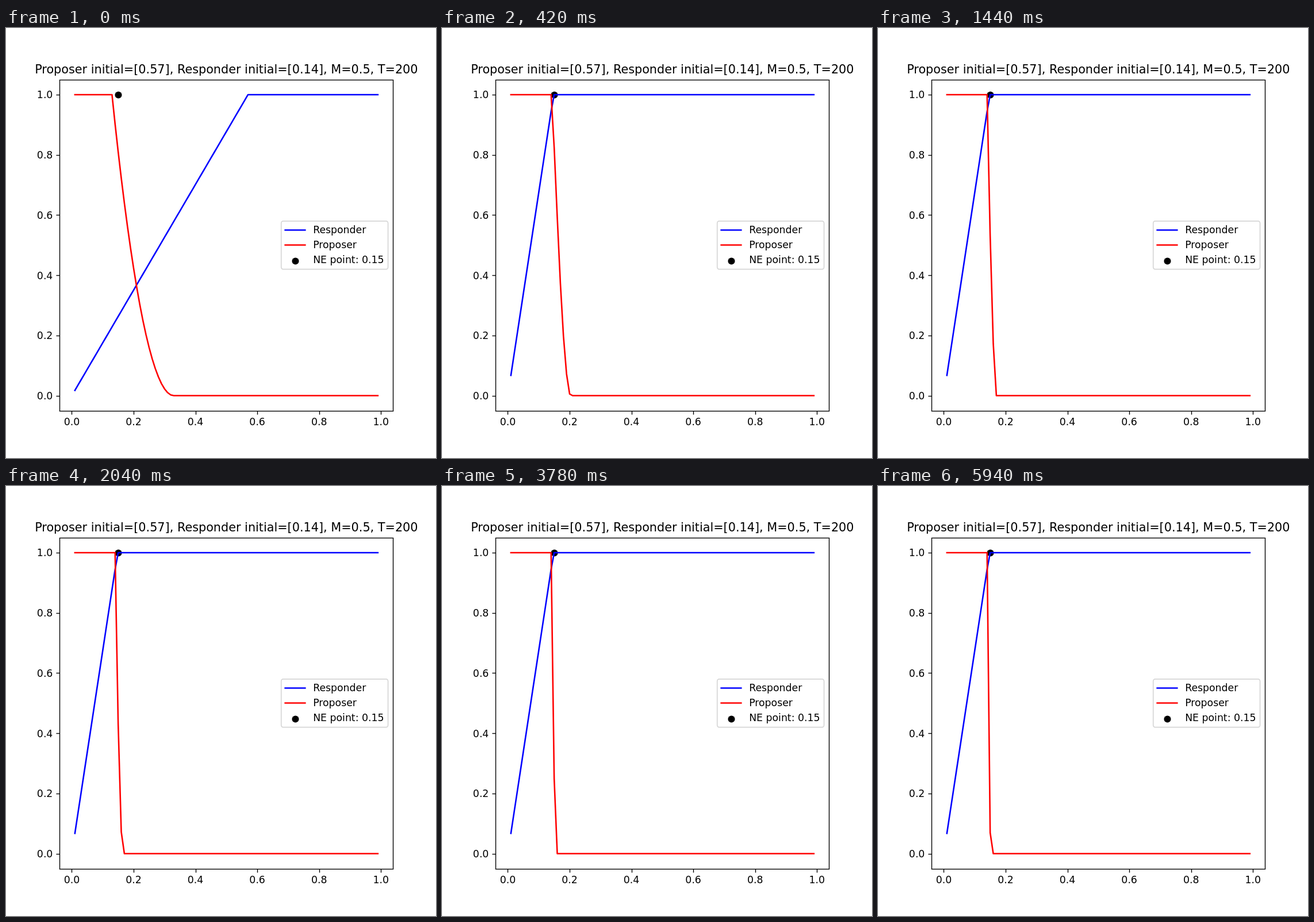
These frames come from a looping animation (748x748 px, 5970 ms). An HTML page with a canvas:

```html
<!DOCTYPE html>
<html lang="en">
<head>
<meta charset="utf-8">
<title>Learning dynamics</title>
<style>
  html, body { margin: 0; width: 100%; height: 100%; overflow: hidden; background: #fff; }
  canvas { display: block; }
</style>
</head>
<body>
<canvas id="stage" width="748" height="748"></canvas>
<script>
const SIZE = 748, STEP_MS = 30, STEPS = 199;
const N = 99, RATE = 0.5;
const FONT = '"DejaVu Sans", sans-serif';
const PT = SIZE / 432;   // six-inch figure
const EM = 10 * PT;
const ctx = document.getElementById('stage').getContext('2d');

// --- Two-player bargaining, regularised leader with Euclidean penalty ---

const grid = Array.from({ length: N }, (_, i) => (i + 1) / 100);
const pure = v => grid.map((_, i) => (i + 1 === Math.round(v * 100) ? 1 : 0));

// Nearest point on the probability simplex.
function project(v) {
  const sorted = [...v].sort((a, b) => b - a);
  let sum = 0, level = 0;
  sorted.forEach((s, i) => {
    sum += s;
    const cut = (sum - 1) / (i + 1);
    if (s > cut) level = cut;
  });
  return v.map(s => Math.max(0, s - level));
}

function cumulate(p) {
  let sum = 0;
  return p.map(v => (sum += v));
}

function simulate() {
  let offers = pure(0.57), limits = pure(0.14);
  const gainP = Array(N).fill(0), gainR = Array(N).fill(0);
  const history = [];
  for (let s = 0; s < STEPS; s++) {
    const accept = cumulate(limits);
    let income = 0;
    for (let i = N - 1; i >= 0; i--) {
      income += offers[i] * grid[i];
      gainP[i] += RATE * (1 - grid[i]) * accept[i];
      gainR[i] += RATE * income;
    }
    offers = project(gainP);
    limits = project(gainR);
    history.push({
      responder: cumulate(limits),
      proposer: cumulate(offers).map(v => 1 - v)
    });
  }
  return history;
}

// --- Chart ---

const box = { l: SIZE * 0.125, r: SIZE * 0.9, t: SIZE * 0.12, b: SIZE * 0.89 };
const px = x => box.l + (box.r - box.l) * (x + 0.039) / 1.078;
const py = y => box.b - (box.b - box.t) * (y + 0.05) / 1.1;
const snap = v => Math.round(v - 0.01) + 0.5;
const frame = { l: snap(box.l), r: snap(box.r), t: snap(box.t), b: snap(box.b) };

function text(str, x, y, align, size = EM) {
  ctx.font = `${size}px ${FONT}`;
  ctx.textAlign = align;
  ctx.fillStyle = '#000';
  ctx.fillText(str, x, y);
}

function line(points, color, width, cap = 'square') {
  ctx.beginPath();
  points.forEach(([x, y]) => ctx.lineTo(x, y));
  ctx.strokeStyle = color;
  ctx.lineWidth = width;
  ctx.lineCap = cap;
  ctx.lineJoin = 'round';
  ctx.stroke();
}

function dot(x, y) {
  ctx.beginPath();
  ctx.arc(snap(x), snap(y), 3.5 * PT, 0, Math.PI * 2);
  ctx.fillStyle = '#000';
  ctx.fill();
}

function curve(values, color) {
  line(values.map((v, i) => [px(grid[i]), py(v)]), color, 1.5 * PT);
}

function axes() {
  const tick = 3.5 * PT, w = 0.8 * PT;
  for (let i = 0; i <= 5; i++) {
    const v = i / 5, x = snap(px(v)), y = snap(py(v));
    line([[x, frame.b], [x, frame.b + tick]], '#000', w, 'butt');
    line([[frame.l, y], [frame.l - tick, y]], '#000', w, 'butt');
    text(v.toFixed(1), px(v), 691, 'center');
    text(v.toFixed(1), box.l - 7 * PT, Math.round(py(v) + 6.4), 'right');
  }
  ctx.lineJoin = 'miter';
  ctx.lineWidth = w;
  ctx.strokeStyle = '#000';
  ctx.strokeRect(frame.l, frame.t, frame.r - frame.l, frame.b - frame.t);
  text('Proposer initial=[0.57], Responder initial=[0.14], M=0.5, T=200',
    (box.l + box.r) / 2, 79, 'center', 12 * PT);
}

function legend() {
  const w = 10.73 * EM, h = 83.6;
  const left = box.r - 0.5 * EM - w, top = (box.t + box.b - h) / 2;
  const x = left + 0.4 * EM;
  ctx.beginPath();
  ctx.roundRect(left, top, w, h, 0.2 * EM);
  ctx.fillStyle = 'rgba(255,255,255,0.8)';
  ctx.fill();
  ctx.strokeStyle = 'rgba(204,204,204,0.8)';
  ctx.lineWidth = PT;
  ctx.stroke();
  line([[x, 351.5], [x + 2 * EM, 351.5]], '#00f', 1.5 * PT);
  line([[x, 377.5], [x + 2 * EM, 377.5]], '#f00', 1.5 * PT);
  dot(x + EM, 405);
  ['Responder', 'Proposer', 'NE point: 0.15'].forEach((s, i) =>
    text(s, x + 2.8 * EM, 357 + 26 * i, 'left'));
}

const history = simulate();

function draw(ms) {
  const state = history[Math.floor(ms / STEP_MS) % STEPS];
  ctx.fillStyle = '#fff';
  ctx.fillRect(0, 0, SIZE, SIZE);
  dot(px(0.15), py(1));
  curve(state.responder, '#00f');
  curve(state.proposer, '#f00');
  axes();
  legend();
}

let start;
function loop(now) {
  start ??= now;
  draw(now - start);
  requestAnimationFrame(loop);
}
draw(0);
requestAnimationFrame(loop);
</script>
</body>
</html>
```
